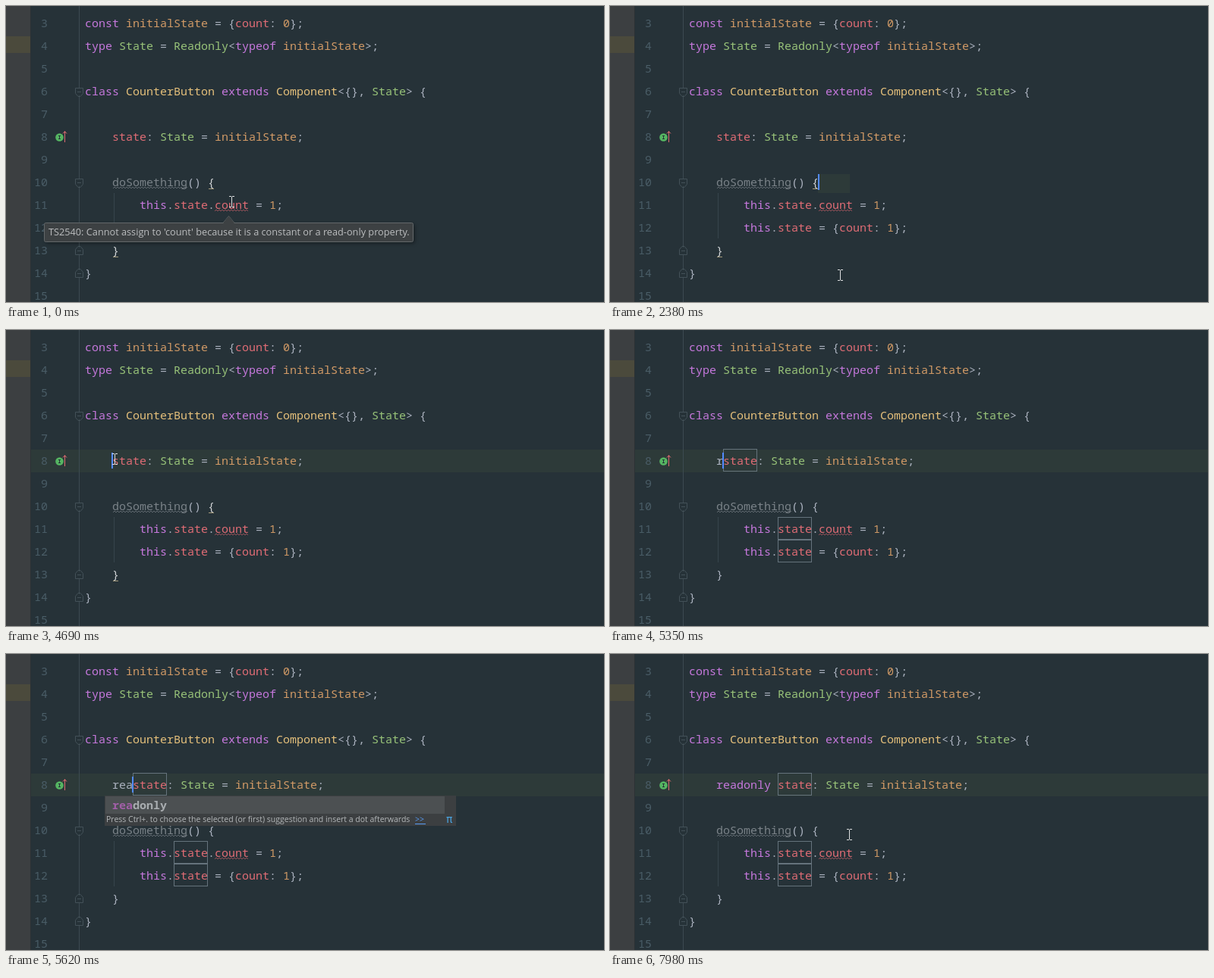
These frames come from a looping animation (788 by 391 pixels, 8000 ms). An HTML page with a canvas:

```html
<!DOCTYPE html>
<html lang="en">
<head>
<meta charset="utf-8">
<title>Code editor</title>
<style>
html, body { margin: 0; height: 100%; overflow: hidden; background: #263238; }
canvas { display: block; }
</style>
</head>
<body>
<canvas id="stage" width="788" height="391"></canvas>
<script>
const ctx = document.getElementById('stage').getContext('2d');
const LOOP = 8000, COL = 9, LEFT = 104;
const CLICK = 4450, MARK = 4960, TYPE = 5350, ACCEPT = 6020, COLOUR = 6170;
const MONO = '15px "Roboto Mono", "Noto Sans Mono", monospace';
const UI = 'px "Open Sans", "Noto Sans", sans-serif';
const COLORS = { k: '#c678dd', o: '#d19a66', r: '#e06c75', g: '#98c379', y: '#e5c07b',
  w: '#abb2bf', d: '#7a8288', m: '#a25fa8', s: '#a9adb0' };

// A tilde starts a run; the letter after it picks the colour.
const code = {
  3: '~kconst ~oinitialState ~w= {~rcount~w: ~o0~w};',
  4: '~ktype ~gState ~w= ~gReadonly~w<~ktypeof ~oinitialState~w>;',
  6: '~kclass ~yCounterButton ~kextends ~yComponent~w<{}, ~gState~w> {',
  10: '~w    ~ddoSomething~w() {',
  11: '~w        ~kthis~w.~rstate~w.~rcount ~w= ~o1~w;',
  12: '~w        ~kthis~w.~rstate ~w= {~rcount~w: ~o1~w};',
  13: '~w    }',
  14: '~w}'
};
const suggestions = [
  ['~mre~sadonly'],
  ['~mre~dnder'],
  ['~dcomponentWill~mRe~dceiveProps'],
  ['~dgetSnapshotBefo~mre~dUpdate'],
  ['~mre~df', 'Inserts reference path comment'],
  ['~drx-~mre~dplay-subject', 'RxJS ReplaySubject import']
];

// Pointer moves, each easing out: start, end, x, y
const moves = [
  [1990, 2380, 303, 355], [2540, 3200, 247, 301], [3910, 4300, 159, 165],
  [4330, 4570, 143, 170], [4840, 5200, 143, 131], [7320, 7321, 213, 161],
  [7450, 7980, 315, 238]
];

const rowY = n => 23 + 30 * (n - 3);

function pointerAt(t) {
  let x = 297, y = 258;
  for (const [start, end, toX, toY] of moves) {
    if (t < start) break;
    const left = (1 - Math.min(1, (t - start) / (end - start))) ** 3;
    x = toX + (x - toX) * left;
    y = toY + (y - toY) * left;
  }
  return [Math.round(x), Math.round(y)];
}

function typedAt(t) {
  const count = t < TYPE ? 0 : t < ACCEPT ? 1 + Math.floor((t - TYPE) / 135) : 9;
  return 'readonly '.slice(0, count);
}

// The caret blinks while idle and stays lit around editing.
function caretAt(t) {
  if (t >= 4030 && t < 7070) return true;
  return Math.floor((t - (t < CLICK ? 150 : 7470)) / 500) % 2 === 0;
}

function rect(color, x, y, w, h) {
  ctx.fillStyle = color;
  ctx.fillRect(x, y, w, h);
}

function text(str, x, y, color, font = MONO) {
  ctx.font = font;
  ctx.fillStyle = color;
  ctx.fillText(str, x, y);
}

function runs(line, x, y, font) {
  for (const run of line.split('~').slice(1)) {
    text(run.slice(1), x, y, COLORS[run[0]], font);
    x += (run.length - 1) * COL;
  }
}

function path(color, points, close) {
  ctx.beginPath();
  points.forEach(([x, y]) => ctx.lineTo(x, y));
  if (close) ctx.closePath();
  ctx.strokeStyle = color;
  ctx.stroke();
}

function wave(x, end, y, color) {
  const points = [];
  for (let i = 0; x + i * 2 <= end; i++) points.push([x + i * 2, y + (i % 2 ? -1 : 1)]);
  ctx.lineWidth = .7;
  path(color, points);
  ctx.lineWidth = 1;
}

function fold(y, dir) {
  const color = '#435158', tip = y + .5 + 6 * dir, side = y + .5 + 2 * dir, flat = y + .5 - 5 * dir;
  rect('#263238', 92, y - 4, 9, 9);
  path(color, [[91.5, flat], [101.5, flat], [101.5, side], [98, tip], [95, tip], [91.5, side]], true);
  path(color, [[94, y + .5], [99, y + .5]]);
}

function gutter() {
  rect('#3c3f41', 0, 0, 32, 391);
  rect('#4b4a3c', 0, 40, 32, 22);
  rect('#2b3134', 32, 0, 1, 391);
  rect('#3c4a51', 96, 0, 1, 391);
  for (let n = 3; n <= 15; n++) text(n, 55 - COL * String(n).length, rowY(n) + 5, '#4a5d67');
  fold(113, 1);
  fold(233, 1);
  fold(323, -1);
  fold(353, -1);
  ctx.beginPath();
  ctx.arc(70.5, 173.5, 5.3, 0, 7);
  ctx.fillStyle = '#55b562';
  ctx.fill();
  rect('#263238', 70, 171, 1, 5);
  rect('#263238', 69, 171, 3, 1);
  rect('#263238', 69, 175, 3, 1);
  path('#db6b70', [[77.5, 180], [77.5, 166]]);
  path('#db6b70', [[75, 168.5], [77.5, 165.5], [80, 168.5]]);
}

function brace(ch, x, y) {
  text(ch, x, y + 5, '#d0d3d6');
  rect('#a59b7c', x + 1, y + 8, COL - 2, 1);
}

function tooltip(alpha) {
  ctx.save();
  ctx.globalAlpha = alpha;
  ctx.beginPath();
  ctx.roundRect(50.5, 286.5, 486, 25, 2);
  ctx.shadowColor = '#0006';
  ctx.shadowBlur = 5;
  ctx.shadowOffsetX = ctx.shadowOffsetY = 2;
  ctx.fillStyle = '#3d4143';
  ctx.fill();
  ctx.shadowColor = 'transparent';
  ctx.strokeStyle = '#63686a';
  ctx.stroke();
  path('#63686a', [[286, 286.5], [293.5, 277.5], [301, 286.5]]);
  ctx.fill();
  rect('#3d4143', 287, 286, 13, 1);
  text("TS2540: Cannot assign to 'count' because it is a constant or a read-only property.",
    56, 303, '#bbbdbf', 12.73 + UI);
  ctx.restore();
}

function popup(prefix) {
  const rest = 'readonly'.slice(prefix.length);
  const rows = prefix === 're' ? suggestions : [[`~m${prefix}~s${rest}`]];
  const bottom = 188 + rows.length * 23;
  rect('#3c3f41', 130, 187, 463, bottom + 16 - 187);
  rect('#4c5052', 131, 188, 447, 23);
  rows.forEach(([name, note], i) => {
    const y = 205 + i * 23;
    runs(name, 140, y, i ? MONO : 'bold ' + MONO);
    if (note) text(note, 571 - note.length * COL, y, COLORS.d);
  });
  text('Press Ctrl+. to choose the selected (or first) suggestion and insert a dot afterwards',
    132, bottom + 11, '#b4b8ba', 10.5 + UI);
  text('>>', 539, bottom + 11, '#589df6', 10.5 + UI);
  rect('#589df6', 539, bottom + 13, 14, 1);
  text('π', 580, bottom + 12, '#4aa3df', '14px "DejaVu Sans", sans-serif');
}

function beam(x, y) {
  const color = '#dcdedf';
  rect(color, x, y - 6, 1, 13);
  for (const side of [-3, 1]) {
    rect(color, x + side, y - 7, 3, 1);
    rect(color, x + side, y + 7, 3, 1);
  }
}

function draw(t) {
  const prefix = typedAt(t), editing = t >= CLICK;
  const stateX = LEFT + (4 + prefix.length) * COL;
  ctx.lineWidth = 1;
  rect('#263238', 0, 0, 788, 391);
  if (editing) rect('#2d3a39', 33, 158, 755, 30);
  else if (t >= 150) {
    const x = t < 2660 ? 274 : 265;
    rect('#2d3a39', x, 222, (t < 2110 ? 301 : 316) - x, 25);
  }
  gutter();
  rect('#37454c', 142, 247, 1, 60);

  const matched = t < MARK;
  for (const n in code) {
    const line = matched && (n == 10 || n == 13) ? code[n].slice(0, -1) : code[n];
    runs(line, LEFT, rowY(n) + 5);
  }
  runs(`~${t < COLOUR ? 'w' : 'k'}${prefix}~rstate~w: ~gState ~w= ~oinitialState~w;`, 140, 178);
  wave(141, 239, 240, '#7a8288');
  wave(275, 320, 270, '#c75f68');
  if (matched) {
    brace('{', 266, 233);
    brace('}', 140, 323);
  } else {
    ctx.strokeStyle = '#65737c';
    for (const [x, n] of [[stateX, 8], [221, 11], [221, 12]])
      ctx.strokeRect(x + .5, rowY(n) - 15.5, 44, 29);
  }

  if (caretAt(t)) rect('#528bff', editing ? stateX - 1 : 274, editing ? 162 : 222, 2, 21);
  if (t < 2380) tooltip(t < 2260 ? 1 : .5);
  if (prefix.length > 1 && t < ACCEPT) popup(prefix);
  if (t < TYPE || t >= 7320) beam(...pointerAt(t));
}

function tick() {
  draw(performance.now() % LOOP);
  requestAnimationFrame(tick);
}
tick();
</script>
</body>
</html>
```
